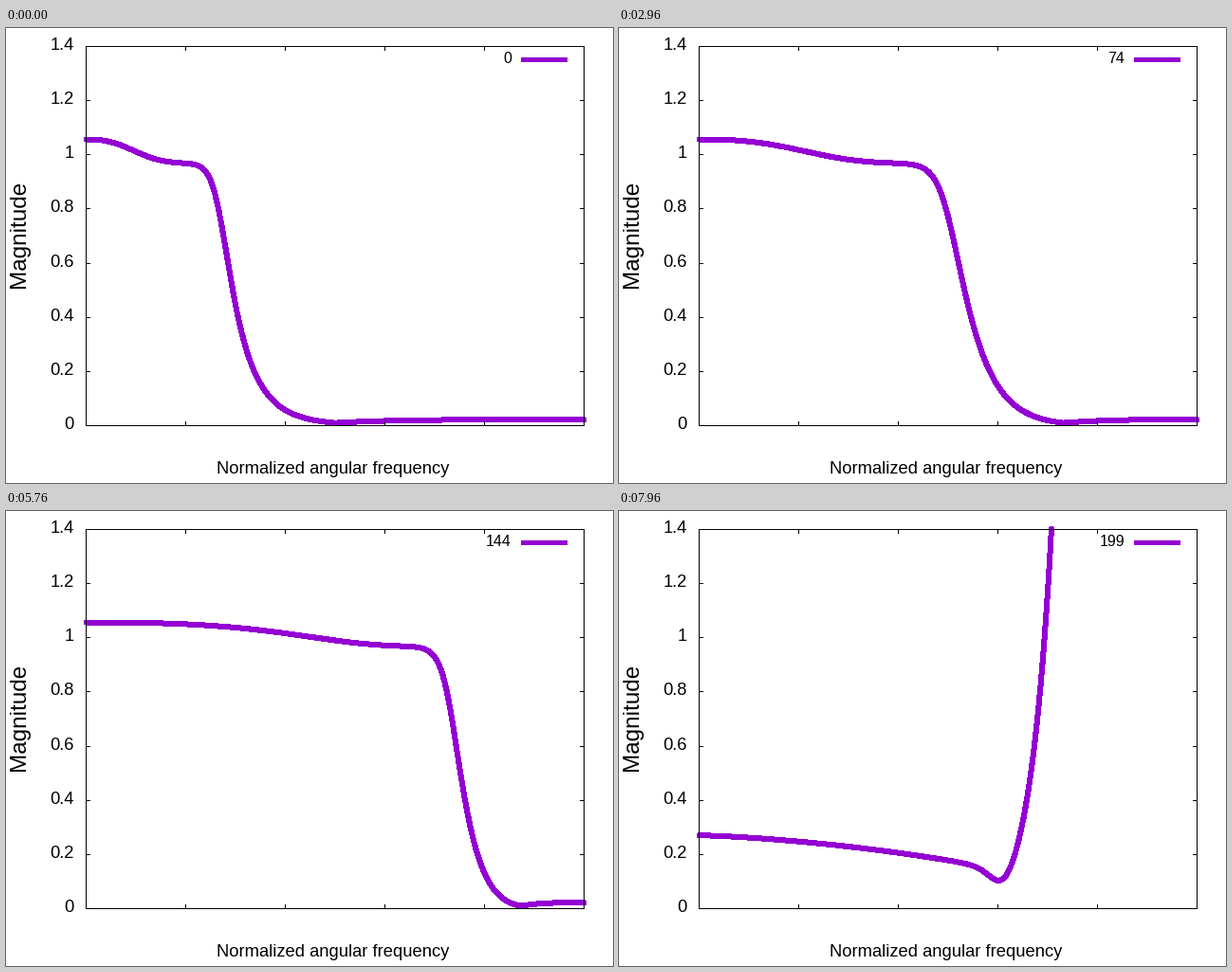
A matplotlib script for the animation above (8 s loop, 640 px wide and 480 px high).

```python
import numpy as np
import matplotlib.pyplot as plt
from matplotlib.animation import FuncAnimation

W, H, DPI = 640, 480, 100
LEFT, RIGHT, TOP, BOTTOM = 84, 609, 19, 419
MAX_MAG = 1.4
SWEEP_END = 157          # cutoff sweeps until here, then the filter is blended
PURPLE = "#9400d3"
FONT = "Liberation Sans"

X = np.linspace(LEFT, RIGHT, RIGHT - LEFT + 1)
U = np.tan(np.clip((X - LEFT) / (RIGHT - LEFT) * np.pi / 2, 1e-3, 1.5705))


def to_y(mag):
    return BOTTOM - mag * (BOTTOM - TOP) / MAX_MAG


def low_pass(n):
    """Fixed response on a frequency axis warped by an all-pass map."""
    u = U * np.tan(0.445) / np.tan(0.445 + 0.005 * n)
    passband = 0.967 + 0.088 * np.exp(-(u / 0.18) ** 2.6)
    rolloff = (1 + (u / 0.4495) ** 18) ** -0.33
    tail = 0.0203 * (1 - np.maximum(u, 1) ** -4)
    return passband * rolloff + tail


def blended(n):
    """Low-pass sinks while a rising branch takes over from the right."""
    t = (n - SWEEP_END) / 100
    r = t / (1 - t)
    sinking = low_pass(SWEEP_END) / (1 + 4.04 * r + 2.24 * r ** 0.75 * U ** 1.45)

    v = U ** 2
    zero = 1.32 * r ** -0.6
    power = max(0, 3.93 * (r - 0.111))
    rising = 8.7 * r * (v / 6.2) ** power * np.maximum(0, 1 - zero / v)

    zero_x = LEFT + (RIGHT - LEFT) * 2 / np.pi * np.arctan(np.sqrt(zero))
    centre, width = zero_x + 1 + 18 * r, 3.3 + 6.5 * r
    mix = 1 / (1 + np.exp((centre - X) / width))
    return (1 - mix) * sinking + mix * rising


def response(n):
    x, mag = X, low_pass(n) if n <= SWEEP_END else blended(n)
    over = np.flatnonzero(mag > MAX_MAG)
    if len(over):
        j = over[0]
        f = (MAX_MAG - mag[j - 1]) / (mag[j] - mag[j - 1])
        x = np.append(x[:j], x[j - 1] + f)
        mag = np.append(mag[:j], MAX_MAG)
    return x + 0.5, to_y(mag)


def pt(px):
    return px * 72 / DPI


fig = plt.figure(figsize=(W / DPI, H / DPI), dpi=DPI, facecolor="white")
ax = fig.add_axes([0, 0, 1, 1])
ax.set_xlim(0, W)
ax.set_ylim(H, 0)
ax.axis("off")


def line(xs, ys, color, px, cap, **kw):
    return ax.plot(xs, ys, color=color, lw=pt(px), solid_capstyle=cap,
                   antialiased=False, snap=False, **kw)[0]


def thin(xs, ys):
    line(np.array(xs) + 0.5, np.array(ys) + 0.5, "black", 1, "projecting",
         zorder=3)


def text(x, y, s, px, **kw):
    return ax.text(x, y, s, fontsize=pt(px), family=FONT, va="baseline",
                   rotation_mode="anchor", **kw)


thin([LEFT, RIGHT, RIGHT, LEFT, LEFT], [TOP, TOP, BOTTOM, BOTTOM, TOP])
for x in range(LEFT + 105, RIGHT, 105):
    thin([x, x], [TOP, TOP + 4])
    thin([x, x], [BOTTOM - 4, BOTTOM])
for i in range(8):
    y = round(to_y(0.2 * i))
    thin([LEFT, LEFT + 4], [y, y])
    thin([RIGHT - 4, RIGHT], [y, y])
    text(72, y + 4, f"{0.2 * i:.1f}".replace(".0", ""), 18.4, ha="right")

text(344.5, 470, "Normalized angular frequency", 18.4, ha="center")
text(20.5, 217, "Magnitude", 24.2, ha="center", rotation=90)
counter = text(533, 37, "0", 16, ha="right")

line([543, 592], [33.5, 33.5], PURPLE, 5, "butt")
curve = line([], [], PURPLE, 5, "round", solid_joinstyle="round")


def draw(n):
    curve.set_data(*response(n))
    counter.set_text(str(n))
    return curve, counter


anim = FuncAnimation(fig, draw, frames=200, interval=40, repeat=True,
                     repeat_delay=0, blit=False)
plt.show()
```
